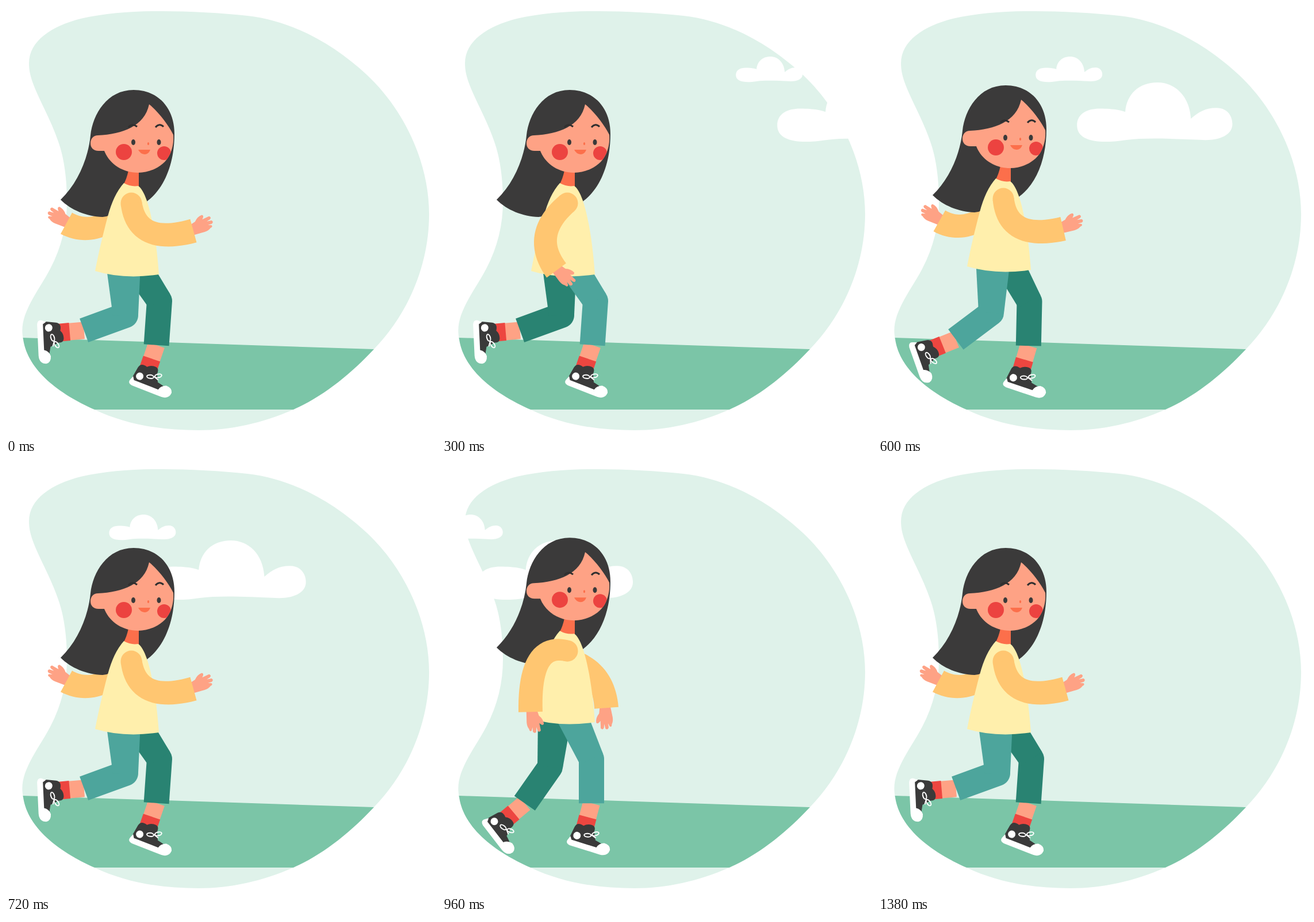
Recreate the animation shown at these times as an HTML page. Size 748x748 px, loop 1.44 s.

```html
<!DOCTYPE html>
<html lang="en">
<head>
<meta charset="utf-8">
<title>Walking girl</title>
<style>
html, body { margin: 0; width: 100%; height: 100%; overflow: hidden; background: #fff; }
svg { display: block; width: 100vw; height: 100vh; }
</style>
</head>
<body>
<svg viewBox="0 0 748 748">
  <defs>
    <path id="blob" d="M270 9C320 9 375 12 420 17C500 26 572 68 628 120C695 183 736 275 736 362C736 450 700 535 640 597C600 640 552 679 500 702C445 726 390 738 335 738C270 738 208 728 154 702C93 675 38 634 30 580C27 566 28 553 33 538C45 506 63 484 77 457C97 419 106 380 106 340C106 300 101 264 91 236C77 195 57 163 46 132C42 120 40 111 40 100C40 60 80 35 130 22C175 12 220 9 270 9Z"/>
    <clipPath id="inside"><use href="#blob"/></clipPath>
    <path id="cloud" fill="#fff" d="M17 19.5C28 19.5 34 21 36 22C37 9 46 0 60 0C73 0 84 10 85 27C91 22 96 19 104 19C113 19 116 26 116 31C116 39 107 43 96 43C71 42 51 41 36 43C16 46 0 44 0 32C0 23 8 19.5 17 19.5Z"/>
    <path id="hand" fill="#fea285" d="M-5 -12L10 -14Q18 -21 27 -20Q31 -17 24 -12L38 -12Q42 -8 37 -6L30 -5L39 -3Q42 1 37 3L29 2L35 5Q37 9 31 9Q26 12 18 11L-5 7Z"/>
    <g id="shoe">
      <path fill="#3a3a3a" d="M-18 3Q-15 -7 -3 -2Q3 -7 11 -6Q19 -5 17 5L20 12L22 19L34 23V36L-24 30L-22 18Z"/>
      <path fill="#fff" d="M-22 20L-26 28Q-28 34 -20 36L34 42Q48 43 50 31Q49 22 38 21Q29 23 26 31L-19 26Z"/>
      <circle cx="-11" cy="17" r="6.5" fill="#fff"/>
      <g fill="none" stroke="#fff" stroke-width="2">
        <ellipse cx="7" cy="13" rx="6" ry="3" transform="rotate(-8 7 13)"/>
        <ellipse cx="20" cy="8" rx="6" ry="3" transform="rotate(-26 20 8)"/>
        <path d="M13 11L22 15"/>
      </g>
    </g>
    <clipPath id="faceClip"><use href="#face"/></clipPath>
  </defs>

  <use href="#blob" fill="#dff2ea"/>
  <use id="small" href="#cloud"/>
  <use id="big" href="#cloud"/>
  <path clip-path="url(#inside)" fill="#7bc5a7" d="M0 576L748 600.5V702H0Z"/>

  <g id="farArm" class="bob"></g>
  <path class="bob" fill="#3b3a3a" d="M222 146C264 146 293 177 293 222C293 275 275 318 245 340L205 350L180 364Q174 367 168 367C140 366 113 355 95 337C125 308 143 265 147 225C151 188 176 146 222 146Z"/>
  <g id="farLeg"></g>
  <g id="nearLeg"></g>
  <g class="bob">
    <path fill="#fc6f4b" d="M213 280H231V316L204 311Q210 301 213 286Z"/>
    <path fill="#ffefac" d="M205 308Q217 315 230 313C248 325 261 395 266 467Q205 476 155 461C162 425 168 400 177 366Q187 328 205 308Z"/>
    <path id="face" fill="#fea285" d="M249 171C263 182 283 207 291 224C292 238 289 250 285 258C276 278 252 290 230 290C203 290 180 275 171 252H161C152 252 147 246 147 239C147 231 152 225 160 225C203 223 241 209 249 171Z"/>
    <g clip-path="url(#faceClip)" fill="#ec4340">
      <circle cx="205" cy="254" r="14"/>
      <circle cx="275" cy="256" r="12"/>
    </g>
    <g fill="#3b3a3a">
      <ellipse cx="221.5" cy="237" rx="3.5" ry="5"/>
      <ellipse cx="266" cy="237" rx="3.5" ry="5"/>
    </g>
    <path fill="none" stroke="#302f2f" stroke-width="3" d="M213 211Q220 203 228 210M260 211Q267 203 274 210"/>
    <ellipse cx="247.5" cy="239.5" rx="1.6" ry="2.5" fill="#fc6f4b"/>
    <path fill="#fc6f4b" d="M230 250H251Q248 258 241 258Q233 257 230 250Z"/>
  </g>
  <g id="nearArm" class="bob"></g>
</svg>
<script>
const $ = id => document.getElementById(id);
const STEP = 60, FRAMES = 24, HALF = 5.5, RAD = Math.PI / 180;

// phase (0..10), knee x, knee y, calf angle from vertical
const STRIDE = [
  [0, 267, 513, 4], [1.5, 200, 528, 22], [2.5, 165, 547, 31], [4, 188, 545, 35],
  [5, 208, 538, 70], [6.5, 262, 533, 63], [7.5, 284, 523, 28], [9, 260, 531, 0]
];
// phase, bend x y, cuff x y
const NEAR = [
  [0, 228, 418, 326, 391], [4, 151, 326, 154, 449], [5, 153, 398, 199, 460],
  [6.5, 165, 402, 233, 460], [7.5, 188, 415, 267, 446]
];
const FAR = [
  [0, 153, 404, 105, 378], [4, 281, 371, 286, 442], [5, 235, 390, 225, 430],
  [6.5, 205, 400, 182, 455], [7.5, 185, 425, 138, 431]
];

// each step lasts five units and then rests until the half cycle ends
const rest = t => Math.min(t % HALF, 5);
const gait = t => (Math.floor(t / HALF) % 2) * 5 + rest(t);
const bob = t => -27 * Math.max(0, Math.sin(Math.PI * (rest(t) - 1.15) / 3.7));

// periodic monotone cubic through the keys
function pose(keys, t) {
  const n = keys.length;
  t %= 10;
  const at = i => {
    const w = Math.floor(i / n), [p, ...v] = keys[i - w * n];
    return { p: p + w * 10, v };
  };
  let i = n - 1;
  while (keys[i][0] > t) i--;
  const [a, b, c, d] = [-1, 0, 1, 2].map(k => at(i + k));
  const h = c.p - b.p, u = (t - b.p) / h, ease = u * u * (3 - 2 * u);
  const slope = (p, q) => p * q > 0 ? 2 * p * q / (p + q) : 0;
  return b.v.map((y, j) => {
    const sec = (p, q) => (q.v[j] - p.v[j]) / (q.p - p.p);
    const s = sec(b, c);
    const m0 = slope(sec(a, b), s) * h, m1 = slope(s, sec(c, d)) * h;
    return y + s * h * ease + u * (u - 1) * (m0 * (u - 1) + m1 * u);
  });
}

const line = (pts, color, width) =>
  `<path d="M${pts.join("L")}" fill="none" stroke="${color}" stroke-width="${width}" stroke-linejoin="round"/>`;
const reach = ([x, y], len, deg) => [x - len * Math.sin(deg * RAD), y + len * Math.cos(deg * RAD)];

function leg([kx, ky, calf], dy, color) {
  const knee = [kx, ky + dy], hip = [210 + 0.35 * (kx - 225), 450 + dy];
  const cuff = reach(knee, 77, calf);
  const sock = reach(cuff, 25, calf + 15), ankle = reach(cuff, 43, calf + 15);
  const dx = knee[0] - hip[0], dz = knee[1] - hip[1], r = 22 / Math.hypot(dx, dz);
  const thigh = [
    [hip[0] - 30, hip[1]], [hip[0] + 30, hip[1]],
    [knee[0] + dz * r, knee[1] - dx * r], [knee[0] - dz * r, knee[1] + dx * r]
  ];
  return line([cuff, ankle], "#fea285", 30)
    + line([sock, ankle], "#ed4640", 31)
    + `<use href="#shoe" transform="translate(${ankle}) rotate(${calf + 11})"/>`
    + line([hip, knee, cuff], color, 44)
    + `<path d="M${thigh.join("L")}Z" fill="${color}"/>`;
}

function arm([bx, by, ex, ey], [sx, sy], flip, twist) {
  const left = [], right = [];
  for (let i = 0; i <= 24; i++) {
    const t = i / 24, v = 1 - t;
    const x = v * v * sx + 2 * v * t * bx + t * t * ex;
    const y = v * v * sy + 2 * v * t * by + t * t * ey;
    const dx = v * (bx - sx) + t * (ex - bx), dy = v * (by - sy) + t * (ey - by);
    const r = (18.5 + 2.5 * t) / Math.hypot(dx, dy);
    left.push([x - dy * r, y + dx * r]);
    right.unshift([x + dy * r, y - dx * r]);
  }
  const turn = Math.atan2(ey - by, ex - bx) / RAD + twist;
  return `<use href="#hand" transform="translate(${ex} ${ey}) rotate(${turn}) scale(.93 ${.93 * flip})"/>`
    + `<g fill="#ffc671"><circle cx="${sx}" cy="${sy}" r="18.5"/>`
    + `<path d="M${left.concat(right).join("L")}Z"/></g>`;
}

function draw(n) {
  const t = n % 12 % (2 * HALF), dy = bob(t), drift = 47.4 * (8 - n);
  $("small").setAttribute("transform", `translate(${369 + drift} 88)`);
  $("big").setAttribute("transform", `translate(${441 + drift} 133) scale(2.33)`);
  for (const el of document.querySelectorAll(".bob")) el.setAttribute("transform", `translate(0 ${dy})`);

  $("farLeg").innerHTML = leg(pose(STRIDE, gait(t)), dy, "#298372");
  $("nearLeg").innerHTML = leg(pose(STRIDE, gait(t + HALF)), dy, "#4da59c");
  $("farArm").innerHTML = arm(pose(FAR, gait(t)), [211, 355], -1, 2);
  $("nearArm").innerHTML = arm(pose(NEAR, gait(t)), [218, 343], 1, -10);
}

let start, shown = -1;
function tick(now) {
  start ??= now;
  const n = Math.floor((now - start) / STEP) % FRAMES;
  if (n !== shown) draw(shown = n);
  requestAnimationFrame(tick);
}
draw(0);
requestAnimationFrame(tick);
</script>
</body>
</html>
```
